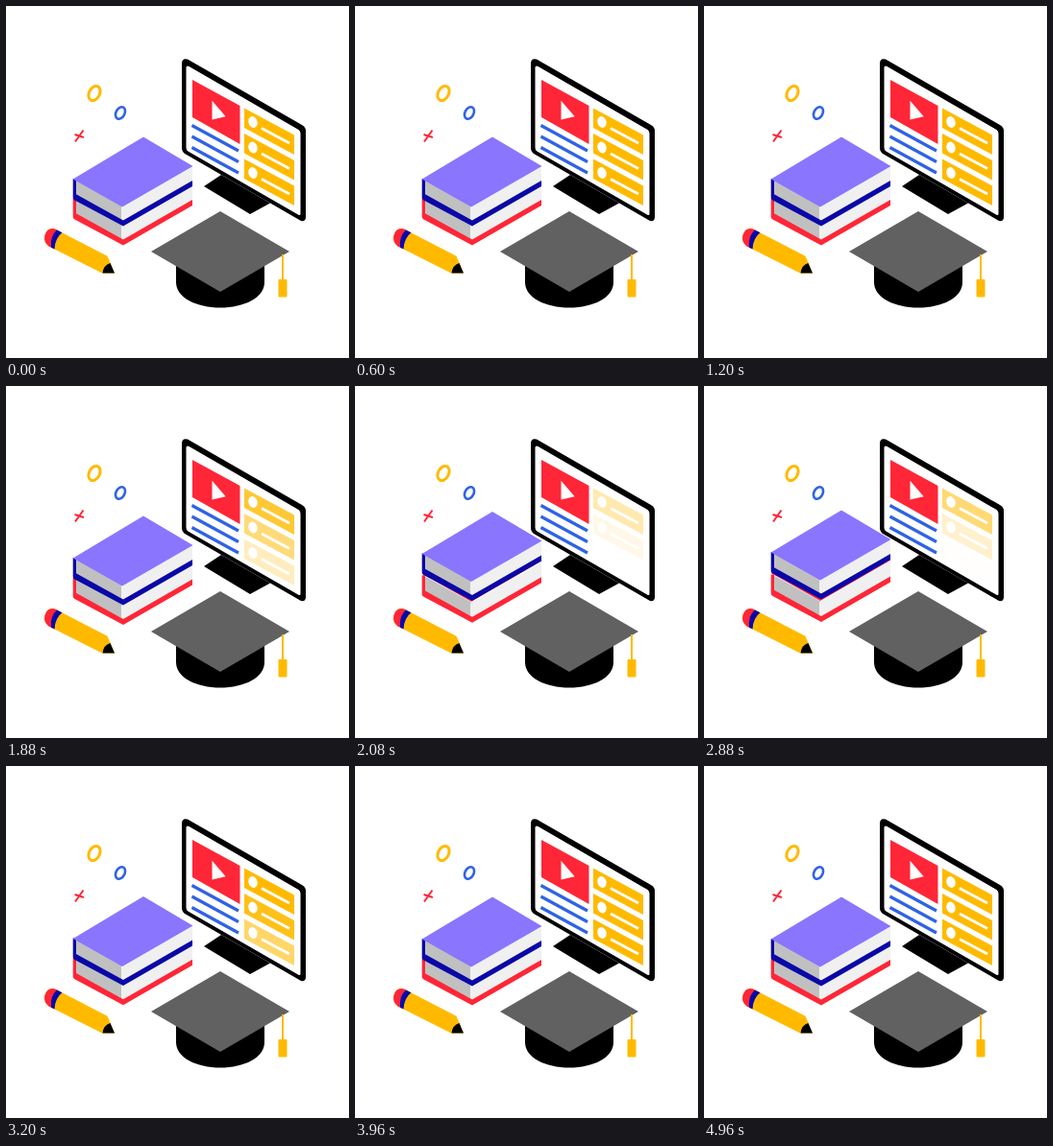
Write an HTML page that moves like this. It is 357 px wide and 367 px high and loops after 5 s.

```html
<!DOCTYPE html>
<html lang="en">
<head>
<meta charset="utf-8">
<title>Online learning</title>
<style>
html, body { margin: 0; width: 100%; height: 100%; overflow: hidden; background: #fff; }
svg { display: block; width: 100%; height: 100%; }
</style>
</head>
<body>
<svg viewBox="0 0 357 367">
  <defs>
    <g id="card">
      <path d="M248 106.500 300 134.500V155L248 127Z" fill="#ffba00"/>
      <ellipse cx="257" cy="121" rx="4.600" ry="6" transform="rotate(-18 257 121)" fill="#fff"/>
      <path d="M266 127.500 295 143" stroke="#fff" stroke-width="2.800" fill="none"/>
    </g>
    <g id="pages">
      <path d="M72.500 181 121 208V225L72.500 198.500Z" fill="#c0c0c0"/>
      <path d="M120 209 194 166.500V183L120 225Z" fill="#f0f0f0"/>
    </g>
    <path id="cover" d="M69.700 180H73V196.300L122 223.500 194 182V188L122 229.500 71.500 202.500Q69.700 201.500 69.700 199.500Z"/>
    <path id="lid" d="M69.700 180.500 143 136.500 194.500 167 121 209.500Z"/>
  </defs>

  <g fill="none">
    <ellipse cx="92" cy="91" rx="5.500" ry="8" transform="rotate(28 92 91)" stroke="#ffba00" stroke-width="3"/>
    <ellipse cx="119" cy="111.500" rx="4.500" ry="6.600" transform="rotate(28 119 111.500)" stroke="#2f63e6" stroke-width="2.600"/>
    <path d="M71.500 134 81 137M72 141.500 80.500 129.500" stroke="#ff2637" stroke-width="2"/>
  </g>

  <g id="monitor">
    <path d="M206 188 224 176 275 205.500 254 217Z"/>
    <path d="M183 60Q183 54 189 55.500L308 124Q312 126.500 312 130V220Q312 225 307 224L187 154.500Q183 152 183 148Z"/>
    <path d="M187.500 64Q188 61.500 190.500 63L304.500 129Q306.500 130.500 306.500 133V216.500Q306.500 219 304 217.500L189.500 151.500Q187.500 150.500 187.500 147.500Z" fill="#fff"/>
    <path d="M194 77 243.500 104V144L194 116Z" fill="#ff2637"/>
    <path d="M214.500 98.800V118.500L228.700 115.300Z" fill="#fff"/>
    <path d="M193.500 124.500 242 151m-48.500-15L242 162.500m-48.500-15L242 174" fill="none" stroke="#2f63e6" stroke-width="3.200"/>
    <use class="card" href="#card"/>
    <use class="card" href="#card" y="26.500"/>
    <use class="card" href="#card" y="53"/>
  </g>

  <g id="lower">
    <g transform="translate(0 20)" fill="#ff2637">
      <use href="#pages"/>
      <use href="#cover"/>
      <use href="#lid" y="-2"/>
    </g>
  </g>
  <g id="upper">
    <use href="#pages"/>
    <use href="#cover" fill="#0a08a8"/>
    <use href="#lid" fill="#8a75ff"/>
  </g>

  <g id="pencil">
    <path d="M51 232.400 105.500 260.700 113 278.500 100 278.500 44.500 250.500Q39 246 40.300 239.500Q43 230.500 51 232.400Z" fill="#ffba00"/>
    <path d="M54 234Q48 240 48.500 252.500L44.500 250.500Q39 246 40.300 239.500Q43 230.500 51 232.400Z" fill="#ff2637"/>
    <path d="M53 233.400 58.500 236.300Q51 242 50.500 253.500L47 251.800Q45.500 240 53 233.400Z" fill="#0a08a8"/>
    <path d="M108.500 268 113 278.500 100.500 278.500Q101.500 270 108.500 268Z"/>
  </g>

  <g id="cap">
    <path d="M177 264V288C177 304 198 314.500 223 314.500S269 304 269 288V264Z"/>
    <path d="M151 256 223 214 295 256 223 298Z" fill="#616161"/>
    <path d="M288 259V286" stroke="#ffba00" stroke-width="2"/>
    <rect x="283.500" y="285" width="9" height="18.500" rx="1" fill="#ffba00"/>
  </g>
</svg>
<script>
const LOOP = 5000, FADE = 600, LIFT = 13.6;
const upper = document.getElementById('upper');
const lower = document.getElementById('lower');
const cards = [...document.querySelectorAll('.card')];

// Smooth step from 0 to 1 over the given span.
function ramp(t, from, to) {
  const u = Math.min(1, Math.max(0, (t - from) / (to - from)));
  return u * u * (3 - 2 * u);
}

const raise = (el, dy) => el.setAttribute('transform', `translate(0 ${-dy})`);

function draw(t) {
  const lift = LIFT * (ramp(t, 1760, 2500) - ramp(t, 2500, 3280));
  raise(upper, lift);
  raise(lower, lift / 2);

  // Cards leave from the bottom up and return from the top down.
  cards.forEach((card, i) => {
    const out = 1705 - i * 115, back = 2565 + i * 150;
    card.setAttribute('opacity', 1 - ramp(t, out, out + FADE) + ramp(t, back, back + FADE));
  });
}

function tick() {
  draw(performance.now() % LOOP);
  requestAnimationFrame(tick);
}
tick();
</script>
</body>
</html>
```
